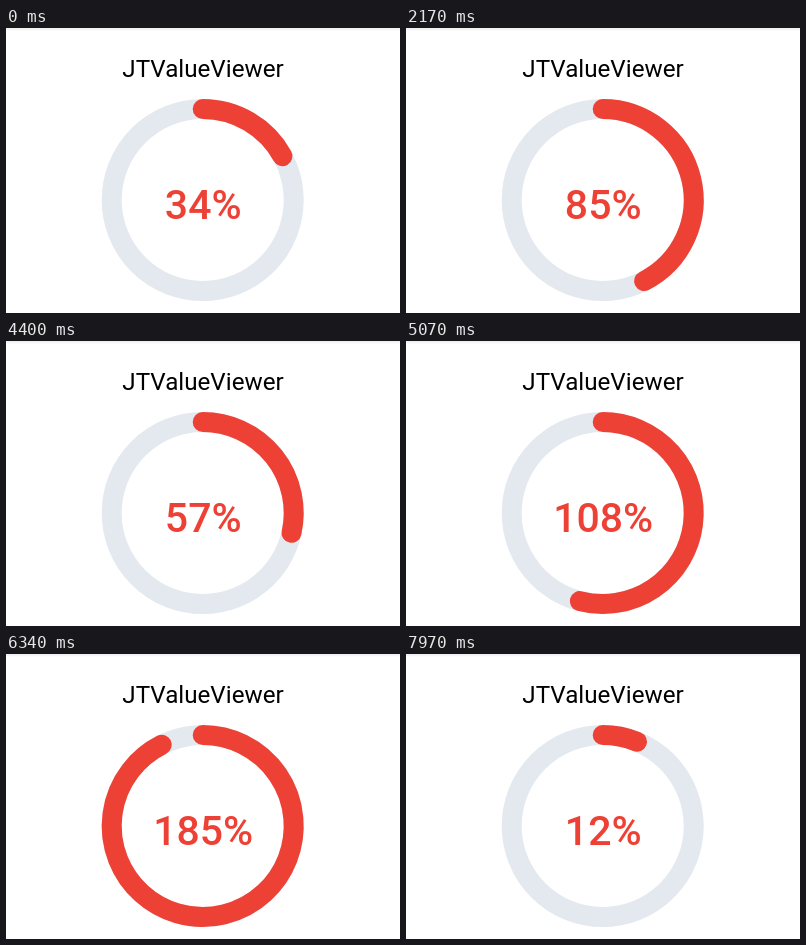
An HTML page that plays this animation: 394 by 285 pixels, repeating every 8 s.

```html
<!DOCTYPE html>
<html lang="en">
<head>
<meta charset="utf-8">
<title>JTValueViewer</title>
<style>
  html, body { margin: 0; width: 100%; height: 100%; overflow: hidden; background: #fff; }
  svg { display: block; width: 394px; height: 285px; }
  text { font-family: Roboto, sans-serif; text-anchor: middle; }
  circle, path { fill: none; stroke-width: 20; }
</style>
</head>
<body>
<svg viewBox="0 0 394 285">
  <defs>
    <linearGradient id="shade" x2="0" y2="1">
      <stop stop-color="#ececec"/>
      <stop offset="1" stop-color="#fff"/>
    </linearGradient>
  </defs>
  <rect width="394" height="3" fill="url(#shade)"/>
  <text x="197" y="49" font-size="24.2" fill="#000">JTValueViewer</text>
  <circle cx="196.7" cy="172" r="91" stroke="#e4e9f0"/>
  <path id="arc" stroke="#ee4136" stroke-linecap="round"/>
  <text id="label" x="197.2" y="190.6" font-size="41" font-weight="500" fill="#ee4136"></text>
</svg>
<script>
  const LOOP = 8000, FPS = 30, MAX = 200, MS_PER_UNIT = 20;
  const CX = 196.7, CY = 172, R = 91;
  // Each run counts from zero to its target; [start ms, target].
  const runs = [[-2000, 34], [486, 85], [2985, 194], [7361, 180]];
  const arc = document.getElementById('arc');
  const label = document.getElementById('label');

  function valueAt(time) {
    const [start, target] = runs.filter(run => run[0] <= time).pop();
    const u = Math.min(1, (time - start) / (target * MS_PER_UNIT));
    return target * (1 - Math.cos(Math.PI * u)) / 2;
  }

  function draw(value) {
    const angle = Math.max(value, 0.01) / MAX * 2 * Math.PI;
    const x = CX + R * Math.sin(angle), y = CY - R * Math.cos(angle);
    const large = angle > Math.PI ? 1 : 0;
    arc.setAttribute('d', `M${CX} ${CY - R}A${R} ${R} 0 ${large} 1 ${x} ${y}`);
    label.textContent = Math.round(value) + '%';
  }

  const began = performance.now();
  function tick() {
    const time = (performance.now() - began) % LOOP;
    const step = Math.floor(time * FPS / 1000 + 0.001);
    draw(valueAt(step * 1000 / FPS));
    requestAnimationFrame(tick);
  }
  tick();
</script>
</body>
</html>
```
